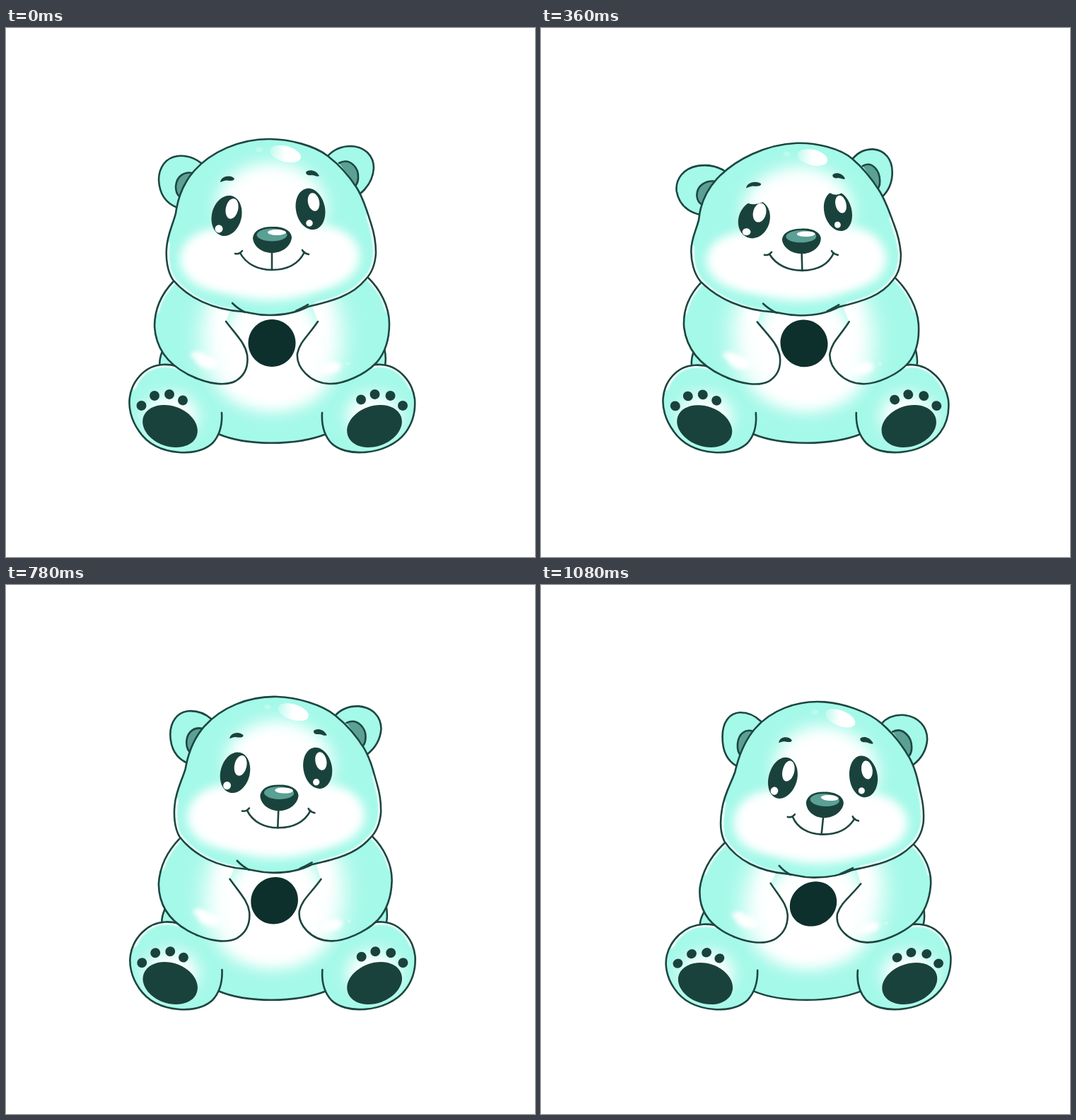
Write an HTML page that moves like this. It is 748 px wide and 748 px high and loops after 1140 ms.

```html
<!DOCTYPE html>
<html lang="en">
<head>
<meta charset="utf-8">
<title>Swaying bear</title>
<style>
  html, body { margin: 0; width: 100%; height: 100%; overflow: hidden; background: #fff; }
  svg { display: block; width: 100vw; height: 100vh; }
</style>
</head>
<body>
<svg id="stage" viewBox="0 0 748 748"></svg>
<script>
const NS = 'http://www.w3.org/2000/svg';
const AQUA = '#a5f9e9', LINE = '#1d4640', DARK = '#1a423c', MID = '#5ba094', BADGE = '#0d302c';
const STEP = 60;
// One entry per step: lean (negative = left) and eyelid (1 = closed).
const LEAN = [0, -.25, -.5, -.75, -1, -1.1, -1, -.75, -.5, -.25, 0, 0, .2, .4, .51, .63, .75, .88, 1];
const LID = [0, 0, 0, 0, 0, 0, .22, .5, .75, 1, 1, 1, .5, 0, 0, 0, 0, 0, 0];

const stage = document.getElementById('stage');
const shapes = [];
let clipCount = 0;

function add(parent, tag, attrs = {}) {
  const el = document.createElementNS(NS, tag);
  for (const k in attrs) el.setAttribute(k, attrs[k]);
  return parent.appendChild(el);
}

function shape(parent, d, attrs) {
  const el = add(parent, 'path', attrs);
  shapes.push({ el, d });
  return el;
}

const fill = (parent, d, color) => shape(parent, d, { fill: color });
const line = (parent, d, color = LINE, width = 2.6) => shape(parent, d, {
  fill: 'none', stroke: color, 'stroke-width': width, 'stroke-linecap': 'round', 'stroke-linejoin': 'round'
});

function ellipse(cx, cy, rx, ry = rx, deg = 0) {
  const a = deg * Math.PI / 180, c = Math.cos(a), s = Math.sin(a), k = .5523;
  const at = (u, v) => `${cx + u * rx * c - v * ry * s},${cy + u * rx * s + v * ry * c}`;
  return `M${at(1, 0)} C${at(1, k)} ${at(k, 1)} ${at(0, 1)} C${at(-k, 1)} ${at(-1, k)} ${at(-1, 0)}` +
    ` C${at(-1, -k)} ${at(-k, -1)} ${at(0, -1)} C${at(k, -1)} ${at(1, -k)} ${at(1, 0)}Z`;
}

const defs = add(stage, 'defs');
for (const n of [1, 3, 7, 11, 16]) {
  const f = add(defs, 'filter', {
    id: 'blur' + n, filterUnits: 'userSpaceOnUse', x: 0, y: 0, width: 748, height: 748,
    'color-interpolation-filters': 'sRGB'
  });
  add(f, 'feGaussianBlur', { stdDeviation: n });
}

function clipped(d) {
  const id = 'clip' + clipCount++;
  const path = shape(add(defs, 'clipPath', { id }), d);
  return { group: add(stage, 'g', { 'clip-path': `url(#${id})` }), path };
}

// A filled part with soft white areas and thin white rims, then its outline.
function part(outline, closing, glows, rims = []) {
  const d = outline + closing;
  const { group } = clipped(d);
  fill(group, d, AQUA);
  for (const [blur, ...e] of glows)
    fill(group, ellipse(...e), '#fff').setAttribute('filter', `url(#blur${blur})`);
  for (const r of rims) line(group, r, '#fff', 7).setAttribute('filter', 'url(#blur1)');
  line(stage, outline);
}

// Body and legs
part('M245,370 L505,370 C528,420 542,462 535,480 L530,560 L453,574 C410,591 340,591 300,574 L225,560 L218,480 C215,468 220,455 240,420Z', '',
  [[11, 377, 450, 70, 80], [11, 377, 482, 86, 60]]);
part('M305,544 C306,560 303,575 292,587 C280,598 262,601 245,600 C220,598 200,588 188,570 C176,553 173,535 175,522 C178,500 196,477 222,476 C240,475 254,481 268,495',
  'Z', [[11, 233, 549, 38, 32]], ['M180,508 C187,490 202,477 222,476 C232,476 240,477 248,481']);
part('M447,544 C446,560 450,576 460,587 C470,597 488,601 505,600 C530,599 553,588 565,572 C577,556 579,540 578,525 C575,500 555,477 530,476 C512,475 496,483 484,496',
  'Z', [[11, 520, 549, 38, 32]], ['M573,508 C566,490 550,477 530,476 C522,476 514,478 508,481']);

// Paws
fill(stage, ellipse(232, 563, 40, 28.5, 20), DARK);
fill(stage, ellipse(521, 563, 40, 28.5, -20), DARK);
for (const [x, y] of [[191.5, 534], [210, 520], [231, 518], [250, 526.5], [502, 525.5], [521.5, 518], [543.5, 520], [561, 534]])
  fill(stage, ellipse(x, y, 6.9), DARK);

// Arms
part('M237,358 C218,378 210,400 210,422 C212,455 232,478 262,492 C285,503 310,507 325,499 C338,491 343,478 341,462 C338,446 328,437 311,415',
  'L322,385Z', [[16, 332, 438, 56, 88], [11, 322, 405, 22, 40], [3, 284, 472, 17, 9, 18], [3, 271, 463, 10, 5, 10]],
  ['M237,358 C224,372 216,385 213,400']);
part('M511,352 C530,370 542,395 542,418 C542,440 537,458 524,473 C508,490 477,504 457,503 C430,502 410,480 412,460 C416,443 426,437 441,415',
  'L430,385Z', [[16, 420, 438, 56, 88], [11, 430, 405, 22, 40], [3, 458, 481, 16, 8, -12], [1, 483, 474.5, 1.5]],
  ['M511,352 C528,368 536,382 539,398']);

fill(stage, ellipse(376, 445.5, 33.5), BADGE);

// Ears
for (const [outer, inner] of [
  ['M276,191 C266,183 254,180 243,181 C226,183 216,197 216,215 C217,235 227,248 242,254',
    'M267,206 C252,201 241,210 240,224 C240,232 242,236 246,239'],
  ['M455,181 C464,171 476,167 488,167 C508,168 520,181 520,198 C519,214 511,226 500,235',
    'M471,191 C486,183 499,197 498,212 C498,216 497,219 495,222']
]) {
  fill(stage, outer + 'Z', AQUA);
  line(stage, outer);
  fill(stage, inner + 'Z', MID);
  line(stage, inner);
}

// Head
part('M372,157 C400,157 436,166 455,181 C472,194 487,212 496,226 C506,242 510,258 516,276 C522,294 523,308 523,318 C522,335 516,348 508,356 C490,378 462,386 427,394 C410,403 392,406 372,406 C352,406 345,402 334,401 C292,398 258,382 236,356 C228,344 226,326 227,312 C228,292 236,278 240,262 C243,240 250,220 266,202 C290,175 330,157 372,157Z', '',
  [[11, 375, 252, 77, 62], [7, 302, 327, 56, 44], [7, 444, 323, 56, 44], [7, 373, 333, 100, 52]],
  ['M228,305 C226,326 228,344 236,356 C258,382 292,398 320,400', 'M513,266 C522,294 523,308 523,318 C522,335 516,348 508,356 C490,378 462,386 440,391']);
line(stage, 'M320,389 C325,394 330,398 338,402');
line(stage, 'M427,391 C422,394 418,396 410,400');

const shine = add(defs, 'linearGradient', { id: 'shine' });
add(shine, 'stop', { offset: 0, 'stop-color': '#fff', 'stop-opacity': .25 });
add(shine, 'stop', { offset: .5, 'stop-color': '#fff' });
fill(stage, ellipse(395, 178, 22.5, 11, 15), 'url(#shine)');
fill(stage, ellipse(358, 172, 5, 3.5), '#fff').setAttribute('opacity', .25);

// Face
fill(stage, 'M303,218 C304,209 318,207 323,213 C322,217 316,216 312,215.5 C308,215.5 306,217 303,218Z', DARK);
fill(stage, 'M424,204 C426,200 438,199 443,209 C440,211 436,208 432,208 C427,209 424,207 424,204Z', DARK);

function eye(ball, glint, dot, lid) {
  const { group, path } = clipped('M0,0');
  fill(group, ellipse(...ball), DARK);
  fill(group, ellipse(...glint), '#fff');
  return { dot: fill(group, ellipse(...dot), '#fff'), clip: shapes.find(s => s.el === path), lid };
}
const eyes = [
  eye([312, 265.5, 21, 29, 14], [319.5, 255.5, 8.7, 14.5, 12], [301, 284, 5.5], [288, 258, 304, 298, 334, 274]),
  eye([430.5, 256, 20.5, 29.5, -12], [435, 246, 8, 13, -12], [429, 276, 4.7], [409, 262, 438, 290, 452, 244])
];

fill(stage, 'M376,281 C394,280 404,288 404,296 C403,309 390,318 376,318 C362,318 350,309 349,297 C350,287 360,281 376,281Z', DARK);
fill(stage, ellipse(376, 292.5, 21.5, 9), MID);
fill(stage, ellipse(383, 289, 13, 4), '#fff');
line(stage, 'M376,318 L376,342');
line(stage, 'M331,318 C340,335 358,342 376,342 C396,342 413,335 422,317');
line(stage, 'M324,319 C328,320 332,318 334,315');
line(stage, 'M428,320 C424,319 420,317 419,314');

const clamp = v => Math.max(0, Math.min(1, v));
const smooth = v => (v = clamp(v), v * v * (3 - 2 * v));

// Bends the figure sideways; the seat stays planted.
function warp(x, y, p) {
  const u = (x - 375) / 150;
  if (p < 0) {
    const bow = 13 * Math.pow(Math.max(0, (550 - y) / 340), 1.6);
    const dx = 10.5 * clamp((590 - y) / 390) + Math.min(bow, 14) * u * u;
    const high = 1.05 / (1 + Math.exp((y - 270) / 25)) + .15 * clamp((587 - y) / 300);
    return [x + p * dx, y - p * high * (4.8 - 4.5 * u + 4 * u * u)];
  }
  const spread = 4 * smooth((300 - y) / 90) * u * u;
  const sway = smooth((587 - y) / 380) * (29 - 6.8 * u + spread);
  const squash = 1 - .25 * smooth((260 - y) / 100);
  const drop = 11.5 * smooth((590 - y) / 300) * squash * Math.pow(p, 2.3);
  const tilt = 11 * smooth((450 - y) / 230) * u * p;
  return [x + p * sway, y + drop + tilt];
}

const bend = (d, p) => d.replace(/(-?[\d.]+),(-?[\d.]+)/g,
  (_, x, y) => warp(+x, +y, p).map(v => v.toFixed(2)).join(','));

let shown = -1;
function draw(i) {
  if (i === shown) return;
  shown = i;
  for (const { clip, lid: [x0, y0, cx, cy, x1, y1], dot } of eyes) {
    const up = (1 - LID[i]) * 52;
    clip.d = `M${x0 - 12},${y0 - up - 22} L${x0},${y0 - up} Q${cx},${cy - up} ${x1},${y1 - up} L${x1 + 12},${y1 - up - 12} L${x1 + 12},320 L${x0 - 12},320Z`;
    dot.setAttribute('visibility', LID[i] > .7 ? 'hidden' : 'visible');
  }
  for (const s of shapes) s.el.setAttribute('d', bend(s.d, LEAN[i]));
}

const start = performance.now();
function tick(now) {
  draw(Math.floor(Math.max(0, now - start) / STEP) % LEAN.length);
  requestAnimationFrame(tick);
}
draw(0);
requestAnimationFrame(tick);
</script>
</body>
</html>
```
